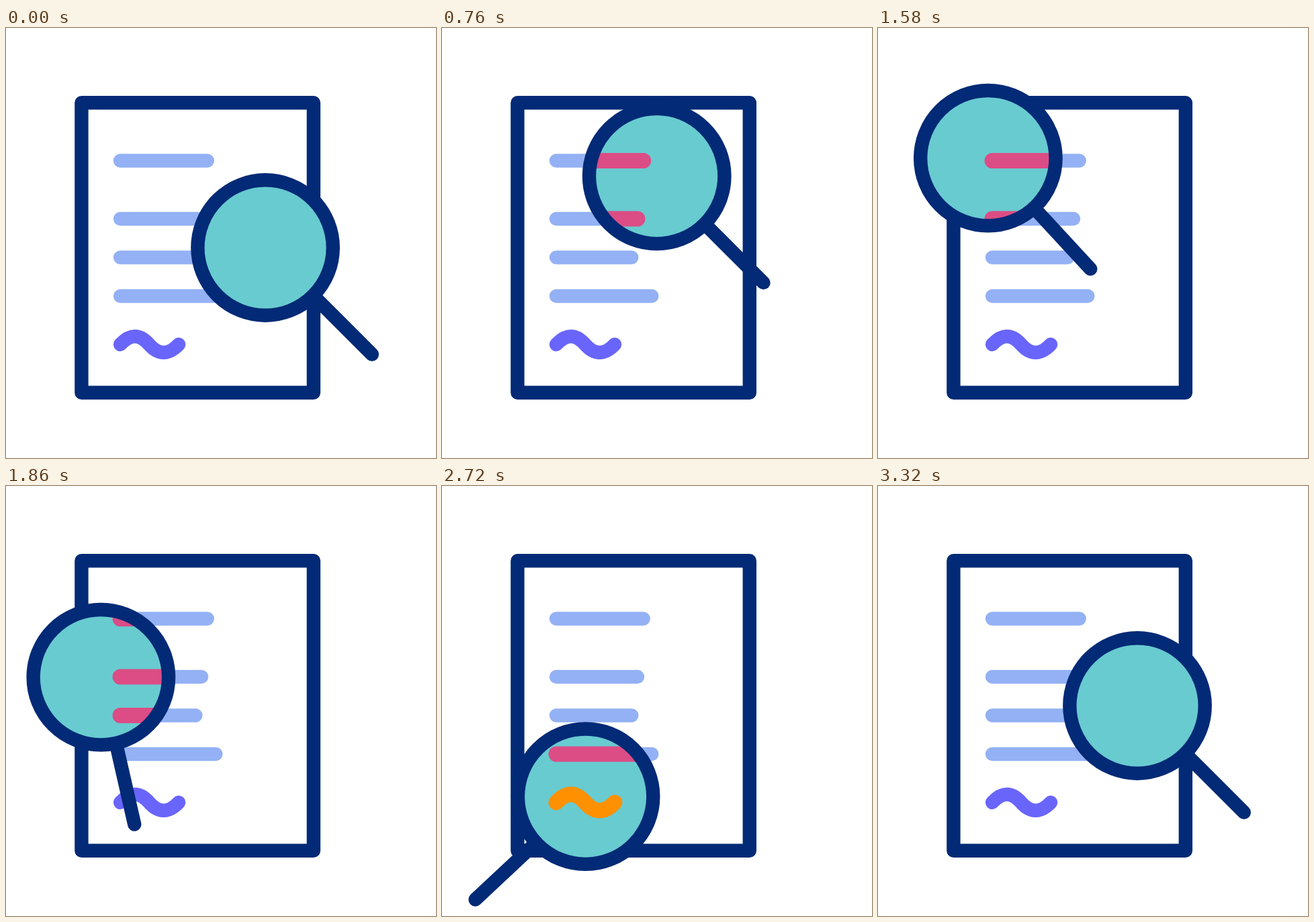
An HTML page that plays this animation: 640x640 px, repeating every 3.62 s.

```html
<!DOCTYPE html>
<html lang="en">
<head>
<meta charset="utf-8">
<title>Document review</title>
<style>
  html, body { margin: 0; width: 100%; height: 100%; overflow: hidden; background: #fff; }
  svg { display: block; width: 100%; height: 100%; }
  .stroke { fill: none; stroke-width: 20.4; stroke-linecap: round; stroke-linejoin: round; }
  .navy { stroke: #022a76; }
  .zoomed { stroke-width: 23; }
</style>
</head>
<body>
<svg viewBox="0 0 640 640">
  <defs>
    <path id="text" d="M170 197.5H299.7M170 284H291M170 341.5H282.3M170 399H312.3"/>
    <path id="squiggle" d="M170 471C185 455 199 455 213 471S242 487 257 471"/>
    <clipPath id="glass"><circle class="follow" r="92"/></clipPath>
  </defs>
  <rect class="stroke navy" x="112.4" y="111.3" width="345.4" height="431.5"/>
  <g class="stroke">
    <use href="#text" stroke="#93b1f4"/>
    <use href="#squiggle" stroke="#6965fa"/>
  </g>
  <circle class="follow" r="100.7" fill="#68cbd0"/>
  <g class="stroke zoomed" clip-path="url(#glass)">
    <use href="#text" stroke="#dc4c85"/>
    <use href="#squiggle" stroke="#ff9100"/>
  </g>
  <g class="stroke navy follow">
    <circle r="100.7"/>
    <path id="handle" d="M101 0H224.5"/>
  </g>
</svg>
<script>
const LOOP = 3620;
const followers = document.querySelectorAll('.follow');
const handle = document.getElementById('handle');

const cubic = (a, b, u) => 3 * u * (1 - u) ** 2 * a + 3 * u * u * (1 - u) * b + u ** 3;

function easing(x1, y1, x2, y2) {
  return x => {
    let lo = 0, hi = 1;
    for (let i = 0; i < 30; i++) {
      const mid = (lo + hi) / 2;
      if (cubic(x1, x2, mid) < x) lo = mid; else hi = mid;
    }
    return cubic(y1, y2, lo);
  };
}

function move(start, end, d, fromAngle, toAngle, ease) {
  const path = document.createElementNS('http://www.w3.org/2000/svg', 'path');
  path.setAttribute('d', d);
  return { start, end, path, length: path.getTotalLength(), fromAngle, toAngle, ease };
}

const moves = [
  move(200, 1240, 'M386 327C372 232 245 147 169 188.5', 45, 45, easing(.35, 0, .8, .9)),
  move(1495, 2415, 'M169 188.5C113 240 146 370 213 462', 45, 137.2, easing(1 / 3, 0, 2 / 3, 1)),
  move(2700, 3320, 'M213 462C265 480 380 415 386 327', 137.2, 45, easing(1 / 3, 0, .833, .833))
];

function draw(time) {
  const current = moves.findLast(m => time >= m.start) || moves[0];
  const span = (time - current.start) / (current.end - current.start);
  const progress = span <= 0 ? 0 : span >= 1 ? 1 : current.ease(span);
  const { x, y } = current.path.getPointAtLength(progress * current.length);
  const angle = current.fromAngle + (current.toAngle - current.fromAngle) * progress;
  followers.forEach(el => el.setAttribute('transform', `translate(${x} ${y})`));
  handle.setAttribute('transform', `rotate(${angle})`);
}

const begin = performance.now();
function tick() {
  draw((performance.now() - begin) % LOOP);
  requestAnimationFrame(tick);
}
tick();
</script>
</body>
</html>
```
